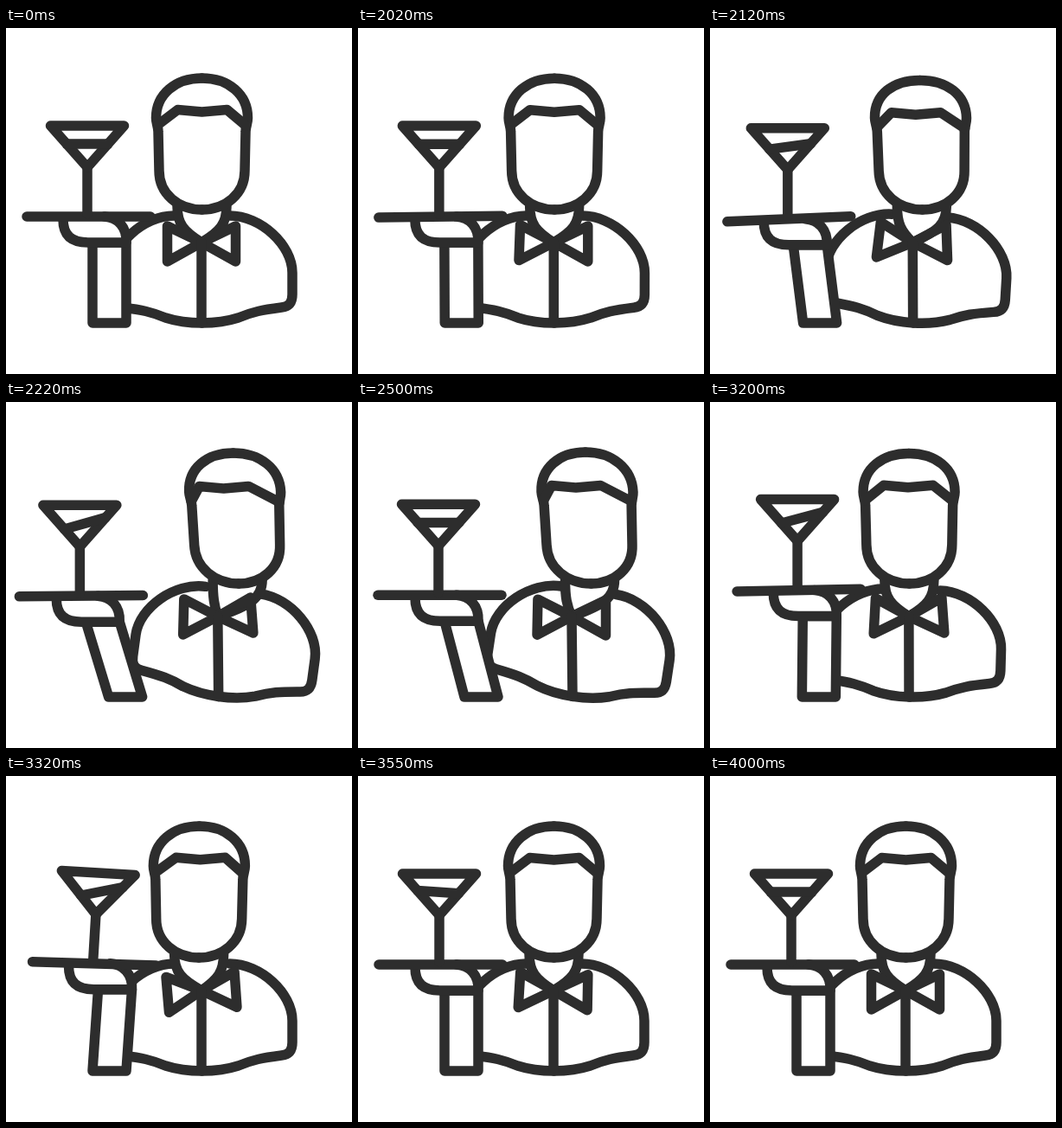
These frames come from a looping animation (400 px wide and 400 px high, 4020 ms). An HTML page with a canvas:

```html
<!DOCTYPE html>
<html lang="en">
<head>
<meta charset="utf-8">
<title>Waiter</title>
<style>
html, body { margin: 0; width: 100%; height: 100%; overflow: hidden; background: #fff; }
canvas { display: block; width: 400px; height: 400px; }
</style>
</head>
<body>
<canvas id="stage" width="400" height="400"></canvas>
<script>
const ctx = document.getElementById('stage').getContext('2d');
const LOOP = 4020, LEAN_AT = 2000, RETURN_AT = 3000;
const MID = 226.5;

const lerp = (a, b, k) => a + (b - a) * k;
const ease = x => (1 - Math.cos(Math.PI * Math.min(1, Math.max(0, x)))) / 2;
const bump = (t, len) => t > 0 && t < len ? Math.sin(Math.PI * t / len) ** 2 : 0;

// Damped swing that stops after a whole number of periods.
function swing(t, size, period, periods, decay) {
  if (t < 0 || t > period * periods) return 0;
  return size * Math.exp(-t / decay) * Math.sin(2 * Math.PI * t / period);
}

// Both moves share one rule; only the direction differs.
function poseAt(t) {
  const dir = t < RETURN_AT ? 1 : -1;
  const dt = t - (dir > 0 ? LEAN_AT : RETURN_AT);
  const move = ms => dir > 0 ? ease(dt / ms) : 1 - ease(dt / ms);
  const push = dir * bump(dt, 500);
  const lean = move(280);
  const bow = swing(dt, .14, 480, 2, 900);
  const liquid = swing(dt - 70, .2, 860, 1, 600);
  const tray = dt < 480 ? -.35 * bow : 0;
  return {
    lean, bow, liquid, tray,
    head: lean + .1 * push,
    elbow: move(310),
    glass: 2 * Math.max(0, tray),
    handX: -8 * push,
    handY: 5.3 * lean + 1.5 * push
  };
}

function trace(p, close) {
  ctx.beginPath();
  for (let i = 0; i < p.length; i += 2) ctx.lineTo(p[i], p[i + 1]);
  if (close) ctx.closePath();
}

function line(p, close) {
  trace(p, close);
  ctx.stroke();
}

function placed(x, y, angle, draw) {
  ctx.save();
  ctx.translate(x, y);
  ctx.rotate(angle);
  draw();
  ctx.restore();
}

// Strokes a half outline on the right and mirrored on the left.
function mirrored(path) {
  for (const side of [1, -1]) {
    ctx.save();
    ctx.scale(side, 1);
    ctx.beginPath();
    path();
    ctx.stroke();
    ctx.restore();
  }
}

function drawTorso(lean) {
  placed(MID + 30 * lean, 285, .15 * lean, () => mirrored(() => {
    ctx.moveTo(32, -68);
    ctx.bezierCurveTo(68, -68, 104.5, -34, 104.5, -2);
    ctx.lineTo(104.5, 23);
    ctx.bezierCurveTo(104.5, 32, 101, 37, 92, 38);
    ctx.bezierCurveTo(69, 41, 59, 43, 42, 50);
    ctx.bezierCurveTo(28, 54.5, 14, 56, 0, 56);
  }));
}

function drawCollar(s) {
  const x = 226 + 21 * s.lean, y = 248;
  for (const side of [1, -1]) {
    const neck = MID + 41.5 * s.head + 28.5 * side;
    ctx.beginPath();
    ctx.moveTo(neck, 206);
    ctx.bezierCurveTo(neck, 226, lerp(x, neck, .75), 235, x, y);
    ctx.stroke();
    const turn = side > 0 ? -.55 * s.liquid : s.bow;
    placed(x, y, turn, () => line([0, 0, 39.5 * side, -19, 39.5 * side, 22], true));
  }
  line([x, y, 226 + 22 * s.lean, 340]);
}

function drawHead(s) {
  const dip = 10 * s.lean * (1 - s.lean);
  const turn = -13 * s.head;
  ctx.save();
  ctx.transform(1, 0, .041 * s.head, 1, MID + 38.5 * s.head, 104);
  mirrored(() => {
    ctx.moveTo(0, -46 + dip);
    ctx.bezierCurveTo(31, -46 + dip, 53, -27, 53, 0);
    ctx.bezierCurveTo(53, 6, 50.5, 10, 50.5, 16);
    ctx.lineTo(49.5, 61);
    ctx.bezierCurveTo(49.5, 88, 27, 106, 0, 106);
  });
  ctx.translate(0, dip + 2 * s.head);
  line([-51, 8, turn - 28, -9.5, turn, -7, turn + 29, -9.5, 51, 9]);
  ctx.restore();
}

// White fills let the arm hide the jacket behind it.
function drawArm(s) {
  const x = s.handX, y = 248 + s.handY, elbow = 100 + 23 * s.elbow;
  trace([100 + x, y, elbow, 341, elbow + 39, 341, 139 + x, y], true);
  ctx.fill();
  ctx.stroke();
  placed(x, s.handY, 0, () => {
    ctx.beginPath();
    ctx.moveTo(66, 221);
    ctx.bezierCurveTo(66, 240, 76, 248, 95, 248);
    ctx.lineTo(139, 248);
    ctx.bezierCurveTo(140, 230, 129, 219, 114, 218);
    ctx.fill();
    ctx.stroke();
  });
}

function drawTray(s) {
  const x = 94 + s.handX - s.lean, y = 218 + s.handY;
  placed(x, y, s.tray, () => line([-70, 0, 73, 0]));
  placed(x, y, s.glass, () => {
    const half = 42.5, top = -105, tip = -57;
    line([0, -3, 0, tip]);
    line([-half, top, half, top, 0, tip], true);
    const left = .44 + s.liquid, right = .44 - s.liquid;
    line([-half * (1 - left), lerp(top, tip, left), half * (1 - right), lerp(top, tip, right)]);
  });
}

function draw(t) {
  const s = poseAt(t);
  ctx.fillStyle = '#fff';
  ctx.fillRect(0, 0, 400, 400);
  ctx.strokeStyle = '#2d2d2d';
  ctx.lineWidth = 11.5;
  ctx.lineCap = ctx.lineJoin = 'round';
  drawTorso(s.lean);
  drawCollar(s);
  drawHead(s);
  drawArm(s);
  drawTray(s);
}

const start = performance.now();
function tick() {
  draw((performance.now() - start) % LOOP);
  requestAnimationFrame(tick);
}
tick();
</script>
</body>
</html>
```
